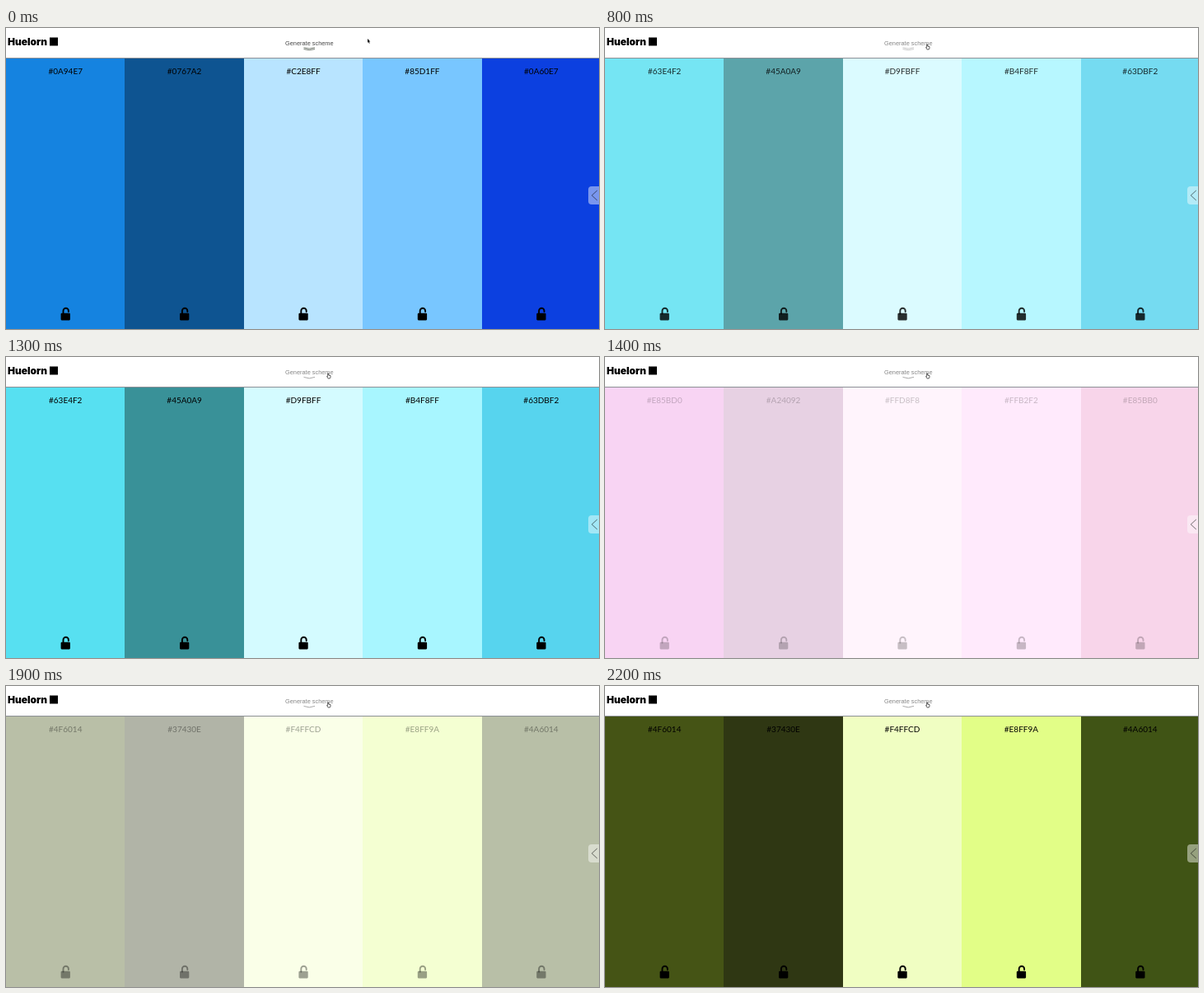
Recreate the animation shown at these times as an HTML page with a canvas. Size 720x365 px, loop 2.3 s.

```html
<!DOCTYPE html>
<html lang="en">
<head>
<meta charset="utf-8">
<title>Colour schemes</title>
<style>
html, body { margin: 0; width: 100%; height: 100%; overflow: hidden; background: #fff; }
canvas { display: block; }
</style>
</head>
<body>
<canvas id="stage" width="720" height="365"></canvas>
<script>
const ctx = document.getElementById('stage').getContext('2d');
const LOOP = 2300, STEP = 100, COL = 144.4, TOP = 37;

// Each scheme: fade start, fade length, swatch fills, labels
const schemes = [
  { at: -400, fade: 300,
    fills: ['#1583e0', '#0e5491', '#b8e4ff', '#78c6ff', '#0c40e0'],
    labels: ['#0A94E7', '#0767A2', '#C2E8FF', '#85D1FF', '#0A60E7'] },
  { at: 512, fade: 400,
    fills: ['#57e0f1', '#399198', '#d4fbff', '#a8f6ff', '#57d4ee'],
    labels: ['#63E4F2', '#45A0A9', '#D9FBFF', '#B4F8FF', '#63DBF2'] },
  { at: 1310, fade: 290,
    fills: ['#e03ec8', '#912d7f', '#fdcbf2', '#fe9fef', '#e0409f'],
    labels: ['#E85BD0', '#A24092', '#FFD8F8', '#FFB2F2', '#E85BB0'] },
  { at: 1733, fade: 400,
    fills: ['#455415', '#2f3713', '#f0fec2', '#e2fe87', '#405415'],
    labels: ['#4F6014', '#37430E', '#F4FFCD', '#E8FF9A', '#4A6014'] }
];

const clamp = v => Math.max(0, Math.min(1, v));
const swing = v => 0.5 - Math.cos(Math.PI * clamp(v)) / 2;

function text(str, x, y, font, color, align = 'center') {
  ctx.font = font;
  ctx.fillStyle = color;
  ctx.textAlign = align;
  ctx.fillText(str, x, y);
}

function box(x, y, w, h, r, color) {
  ctx.fillStyle = color;
  ctx.beginPath();
  ctx.roundRect(x, y, w, h, r);
  ctx.fill();
}

function line(points, color, width) {
  ctx.strokeStyle = color;
  ctx.lineWidth = width;
  ctx.beginPath();
  points.forEach(([x, y]) => ctx.lineTo(x, y));
  ctx.stroke();
}

function padlock(x) {
  box(x - 5.6, 345.8, 11.3, 8.6, 1.1, '#000');
  ctx.strokeStyle = '#000';
  ctx.lineWidth = 1.9;
  ctx.lineCap = 'round';
  ctx.beginPath();
  ctx.moveTo(x - 2.7, 346.5);
  ctx.lineTo(x - 2.7, 343);
  ctx.arc(x + 0.5, 343, 3.2, Math.PI, 0);
  ctx.lineTo(x + 3.7, 344);
  ctx.stroke();
  ctx.lineCap = 'butt';
}

function swatches(t) {
  const s = schemes.filter(s => t >= s.at).pop();
  ctx.globalAlpha = swing((t - s.at) / s.fade);
  s.fills.forEach((fill, i) => {
    const left = Math.round(i * COL), mid = (i + 0.5) * COL;
    ctx.fillStyle = fill;
    ctx.fillRect(left, TOP, Math.round((i + 1) * COL) - left, 365 - TOP);
    text(s.labels[i], mid, 55.5, '10px Lato, sans-serif', '#000');
    padlock(mid);
  });
  ctx.globalAlpha = 1;
}

function smile(y, depth, color, width) {
  ctx.strokeStyle = color;
  ctx.lineWidth = width;
  ctx.beginPath();
  ctx.moveTo(361.5, y);
  ctx.quadraticCurveTo(368.2, y + depth * 2, 375, y);
  ctx.stroke();
}

function button(t, hover) {
  text('Generate scheme', 368.3, 21, '7.36px "Liberation Sans", Arial, sans-serif', hover ? '#858585' : '#454545');
  const phase = t % 800;
  if (phase < 200 || phase >= 700) {
    const color = hover ? '#c4c4c4' : '#626a60';
    smile(23.8, 1.3, color, 0.9);
    smile(25.6, 1.2, color, 0.9);
  } else {
    smile(24.4, 1.5, hover ? '#aaa' : '#666', 1);
  }
}

function arrow(x, y) {
  ctx.fillStyle = '#111';
  ctx.beginPath();
  [[0, 0], [0, 4.8], [1.1, 3.9], [1.9, 5.8], [2.7, 5.4], [1.9, 3.6], [3.4, 3.5]]
    .forEach(([dx, dy]) => ctx.lineTo(x + dx, y + dy));
  ctx.fill();
}

function hand(x, y) {
  ctx.strokeStyle = '#333';
  ctx.lineWidth = 0.8;
  ctx.fillStyle = '#fff';
  ctx.beginPath();
  [[-1.3, -3], [-0.3, -3], [-0.2, -0.9], [2, -0.4], [2, 1.4], [1.2, 3], [-0.9, 3], [-2.4, 0.5], [-1.3, 0.4]]
    .forEach(([dx, dy]) => ctx.lineTo(x + dx, y + dy));
  ctx.closePath();
  ctx.fill();
  ctx.stroke();
}

function draw(t) {
  ctx.fillStyle = '#fff';
  ctx.fillRect(0, 0, 720, 365);
  swatches(t);

  ctx.fillStyle = '#8c9096';
  ctx.fillRect(0, 36, 720, 1);
  text('Huelorn', 2, 21, '900 12px Inter, sans-serif', '#000', 'left');
  box(53, 11.5, 10, 10, 0, '#000');

  const move = swing(t / 300);
  const x = 439 - 47 * move, y = 13 + 10 * move;
  const hover = x < 399;
  button(t, hover);
  if (hover) hand(x, y);
  else arrow(x, y);

  box(707, 192, 16, 22, 4, 'rgba(255,255,255,.45)');
  line([[717.8, 197], [711.3, 203], [717.8, 209]], 'rgba(0,0,0,.55)', 1);
}

function tick(now) {
  draw(Math.floor((now % LOOP) / STEP) * STEP);
  requestAnimationFrame(tick);
}
draw(0);
requestAnimationFrame(tick);
</script>
</body>
</html>
```
